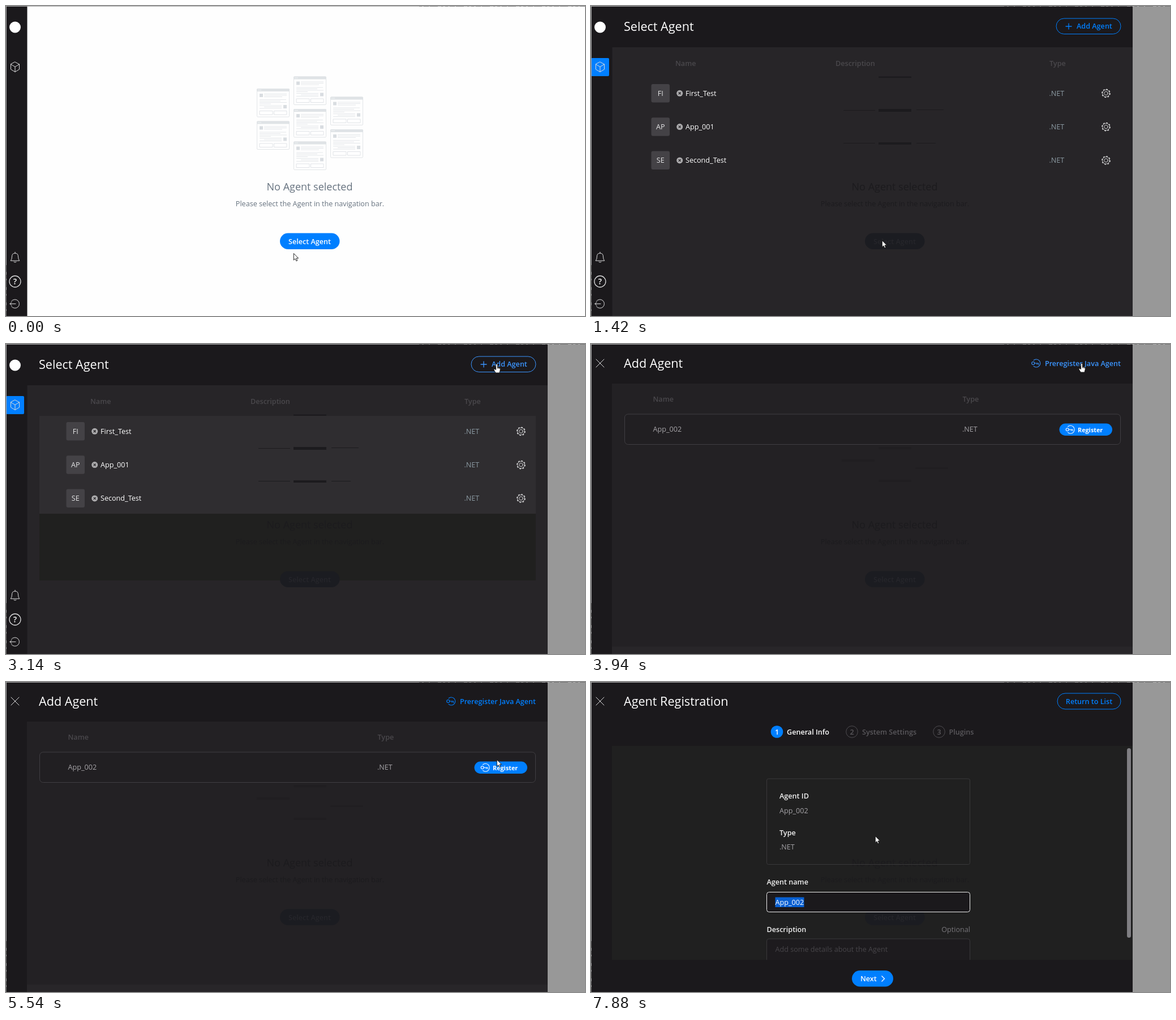
An HTML page that plays this animation: 1023x548 px, repeating every 8 s.

```html
<!DOCTYPE html>
<html lang="en">
<head>
<meta charset="utf-8">
<title>Agent registration</title>
<style>
html, body { margin: 0; width: 100%; height: 100%; overflow: hidden; background: #fefefe; }
svg { display: block; width: 1023px; height: 548px; font: 12.6px "Open Sans", sans-serif; }
.h1 { font-size: 21.6px; fill: #fff; }
.b { font-weight: 600; }
.mid { text-anchor: middle; }
.end { text-anchor: end; }
.white { fill: #fff; }
.head { font-weight: 600; fill: #4a484c; }
.soft { fill: #a5a3a7; }
.type { fill: #8b9aa2; }
.blue { fill: #007fff; }
.line { fill: none; stroke: #dcdcdd; stroke-linecap: round; stroke-linejoin: round; }
.edge { fill: none; stroke: #007fff; }
.bar { fill: #1b191c; }
.ghost { fill: #1c1b1e; }

.scene, .hover, .tint, #arrow, #hand { display: none; }
.home #home, .list #list, .add #add, .form #form,
.home #menu, .list #menu, .arrow #arrow, .hand #hand { display: inline; }
.list .active { fill: #007fff; }
.row3 .r3, .row1 .r1, .low .tint.lo, .all .tint { display: inline; }

.home.hot .cta, .add.reg .cta2 { fill: #3399ff; }
.home.press .cta, .add.press .cta2 { fill: #006bd8; }
.list.hot .new .blue, .add.pre .link .blue { fill: #3b95ff; }
.list.hot .new .edge, .add.pre .link .edge { stroke: #3b95ff; }
.list.press .new .blue { fill: #006bd8; }
.list.press .new .edge { stroke: #006bd8; }
</style>
</head>
<body>
<svg id="stage" viewBox="0 0 1023 548" class="home arrow">
  <defs>
    <g id="card">
      <rect x=".5" y=".5" width="57" height="49.5" rx="1.5" fill="#fefefe" stroke="#e2e5e8"/>
      <path d="M0 1.5Q0 0 1.5 0H56.5Q58 0 58 1.5V5H0Z" fill="#dfe3e6"/>
      <path d="M2 2.5H8" stroke="#fff" stroke-dasharray="1.2 1"/>
      <path d="M5 9h6v6H5ZM47 29h6v6H47Z" fill="#d9dde1"/>
      <path d="M13 9.5H53M13 12H53M13 14.5H45M5 19.5H52M5 22H42M5 24.5H53M5 27H25M5 30H44M13 32.5H44M5 35H44" stroke="#e4e7ea"/>
      <path d="M5 39.5H28V46H5ZM30.500 39.500H53V46H30.500Z" fill="#fff" stroke="#e0e3e7"/>
    </g>
    <g id="gear" class="line">
      <circle r="7.100" stroke-width="1.500" stroke-dasharray="2.790" stroke-linecap="butt"/>
      <circle r="6.200" stroke-width=".8"/>
      <circle r="3.200" stroke-width=".9"/>
    </g>
    <g id="off">
      <circle r="5.500" fill="#acabad"/>
      <path d="M-2 -2L2 2M2 -2L-2 2" stroke="#272528" stroke-width="1.300"/>
    </g>
    <g id="key" fill="none" stroke-width="1.100" stroke-linecap="round">
      <circle cx="-4.800" r="2.500"/>
      <path d="M-2.300 0H4.500V2.500M2 0V2M-4 -5.200A7 7 0 1 1 -4 5.200"/>
    </g>
    <path id="close" class="line" d="M-7 -7L7 7M7 -7L-7 7"/>
    <g id="under" class="ghost">
      <text x="536.500" y="326" class="mid" font-size="18">No Agent selected</text>
      <text x="537" y="353.500" class="mid">Please select the Agent in the navigation bar.</text>
      <rect x="484" y="401.500" width="105.500" height="28.500" rx="14.250" fill="#1b1c21"/>
      <text x="536.500" y="420.500" class="mid b" fill="#26262b">Select Agent</text>
    </g>
  </defs>

  <rect width="1023" height="548" fill="#fefefe"/>

  <g id="home" class="scene">
    <use href="#card" x="443" y="146"/><use href="#card" x="443" y="203.500"/>
    <use href="#card" x="508" y="124.500"/><use href="#card" x="508" y="182"/><use href="#card" x="508" y="239.500"/>
    <use href="#card" x="573" y="160.500"/><use href="#card" x="573" y="218"/>
    <text x="536.500" y="326" class="mid" font-size="18" fill="#66727f">No Agent selected</text>
    <text x="537" y="353.500" class="mid" fill="#66727f">Please select the Agent in the navigation bar.</text>
    <rect class="blue cta" x="484" y="401.500" width="105.500" height="28.500" rx="14.250"/>
    <text x="536.500" y="420.500" class="mid b white">Select Agent</text>
  </g>

  <g id="list" class="scene">
    <rect x="37" width="920" height="548" fill="#272528"/>
    <rect class="bar" x="37" width="920" height="73"/>
    <rect x="957" width="66" height="548" fill="#989898"/>
    <rect class="tint" x="59" y="127" width="877" height="120" fill="#2f2d30"/>
    <rect class="tint lo" x="59" y="246" width="877" height="54" fill="#2f2d30"/>
    <rect class="tint lo" x="59" y="300" width="877" height="118" fill="#20201f"/>
    <use href="#under"/>
    <path class="ghost" d="M508 124.500h58v2.500h-58ZM508 182h58v5h-58ZM508 241h58v4h-58ZM446 184h56v1h-56ZM575 183h48v1h-48ZM446 242h56v1h-56ZM575 242h34v1h-34Z"/>
    <rect class="hover r1" x="59.500" y="127.500" width="876" height="53" rx="6" fill="none" stroke="#15548e"/>
    <rect class="hover r3" x="59.500" y="246.500" width="876" height="53" rx="6" fill="none" stroke="#15548e"/>
    <text x="58" y="43.500" class="h1">Select Agent</text>
    <g class="new">
      <rect class="edge" x="822" y="22" width="114" height="27.500" rx="13.750"/>
      <path class="edge" d="M838.500 36h11M844 30.500v11" stroke-width="1.300"/>
      <text x="858" y="40.300" class="b blue">Add Agent</text>
    </g>
    <g class="head">
      <text x="149" y="105.500">Name</text>
      <text x="432" y="105.500">Description</text>
      <text x="810" y="105.500">Type</text>
    </g>
    <g id="rows"></g>
  </g>

  <g id="add" class="scene">
    <rect width="957" height="548" class="bar"/>
    <rect x="957" width="66" height="548" fill="#989898"/>
    <rect x="37" y="70" width="920" height="478" fill="#232124"/>
    <rect x="37" y="535" width="920" height="13" fill="#282629"/>
    <use href="#under"/>
    <path d="M443 146h58v4h-58ZM443 204h58v4h-58ZM508 182h58v4h-58ZM508 240h58v4h-58ZM573 218h58v3h-58Z" fill="#201e21"/>
    <rect x="59.500" y="124" width="876" height="53.500" rx="6" fill="#211f22" stroke="#403e42"/>
    <use href="#close" x="16" y="34"/>
    <text x="58" y="41.500" class="h1">Add Agent</text>
    <g class="link">
      <use href="#key" x="786" y="34" class="edge"/>
      <text x="936" y="38.500" class="b blue end">Preregister Java Agent</text>
    </g>
    <text x="109.500" y="102" class="head">Name</text>
    <text x="656.500" y="102" class="head">Type</text>
    <text x="109.500" y="155.300" class="soft">App_002</text>
    <text x="656" y="155.300" class="soft">.NET</text>
    <rect class="blue cta2" x="827.500" y="140.500" width="93.500" height="21.500" rx="10.750"/>
    <use href="#key" x="846.500" y="151.200" stroke="#fff"/>
    <text x="860" y="155.500" class="white" font-size="10.800" font-weight="700">Register</text>
  </g>

  <g id="form" class="scene">
    <rect width="957" height="548" class="bar"/>
    <rect x="957" width="66" height="548" fill="#989898"/>
    <rect x="37" y="113" width="920" height="378.500" fill="#202020"/>
    <use href="#under"/>
    <use href="#close" x="16" y="34"/>
    <text x="58" y="41.500" class="h1">Agent Registration</text>
    <rect class="edge" x="824" y="20" width="112" height="28" rx="14"/>
    <text x="880" y="38.500" class="b blue mid">Return to List</text>
    <circle cx="328.500" cy="88" r="10.800" class="blue"/>
    <g fill="none" stroke="#4d4b4f"><circle cx="461" cy="88" r="10.300"/><circle cx="615" cy="88" r="10.300"/></g>
    <g class="b" fill="#5a585c">
      <text x="328.500" y="92.500" class="mid white">1</text><text x="346" y="92.500" class="white">General Info</text>
      <text x="461" y="92.500" class="mid">2</text><text x="479" y="92.500">System Settings</text>
      <text x="615" y="92.500" class="mid">3</text><text x="632.500" y="92.500">Plugins</text>
    </g>
    <rect x="947" y="117" width="7" height="335" rx="3.500" fill="#7f7e82"/>
    <rect x="310.500" y="171" width="359" height="151.500" rx="3" fill="none" stroke="#39383a"/>
    <g class="b" fill="#f2f2f2">
      <text x="333" y="206.300">Agent ID</text>
      <text x="333" y="271">Type</text>
      <text x="310.500" y="358">Agent name</text>
      <text x="310.500" y="442">Description</text>
    </g>
    <g class="soft"><text x="333" y="231.500">App_002</text><text x="333" y="296.300">.NET</text></g>
    <rect x="310.500" y="371.500" width="359" height="35" rx="4" fill="#1b191c" stroke="#ededed"/>
    <rect x="325.500" y="380.500" width="51" height="17.500" fill="#0860d2"/>
    <text x="325.500" y="394" class="white">App_002</text>
    <text x="670" y="442" class="end" fill="#77757a">Optional</text>
    <path d="M310.500 491.500V458q0-4 4-4H665.500q4 0 4 4V491.500" fill="#1d1b1e" stroke="#39383a"/>
    <text x="325.500" y="477.300" fill="#474549">Add some details about the Agent</text>
    <rect class="bar" x="37" y="491.500" width="920" height="56.500"/>
    <rect class="blue" x="461" y="510" width="73" height="28.500" rx="14.250"/>
    <text x="476" y="529" class="b white">Next</text>
    <path d="M513.500 519.500L518.500 524.500L513.500 529.500" fill="none" stroke="#fff" stroke-width="1.300"/>
  </g>

  <g id="menu" class="scene">
    <rect class="bar" width="37.500" height="548"/>
    <circle cx="16" cy="37.500" r="10" class="white"/>
    <rect class="bar active" y="92" width="32" height="32" rx="2"/>
    <path class="line" d="M16 99L23.500 103V112L16 116.500L8.500 112V103ZM8.500 103L16 107.500L23.500 103M16 107.500V116.500"/>
    <path class="line" d="M8.500 450Q10.500 448 10.500 443Q10.500 437 16 437Q21.500 437 21.500 443Q21.500 448 23.500 450ZM16 437V435M14 452.500Q16 454 18 452.500"/>
    <circle class="line" cx="16" cy="487" r="10" stroke-width="1.300"/>
    <text x="16" y="492" class="mid b white" font-size="14">?</text>
    <path class="line" d="M9.500 522A7.700 7.700 0 1 1 9.500 531M17 526.500H7M10 523.500L7 526.500L10 529.500"/>
  </g>

  <path d="M.5 0V548M0 .5H1023" stroke="#a8a8a8"/>
  <path d="M730 .5H1023" stroke="#777" stroke-dasharray="5 3 9 2 14 6 3 4"/>
  <path d="M.5 458V548" stroke="#666" stroke-dasharray="12 5 7 3"/>

  <g id="cursor" stroke="#111" stroke-width=".9" fill="#fff" stroke-linejoin="round">
    <path id="arrow" d="M.3 .4V12.200L3 9.700L4.900 13.800L6.800 13L5 8.900H8.600Z"/>
    <path id="hand" d="M-1.400 1.500Q-1.400 .2 0 .2T1.400 1.500V6L4.800 6.700Q6.200 7 6.200 8.500V11L5 16H-1.800L-4.600 11.300Q-6 9 -4 9L-1.400 10.500ZM1.400 6V8.500M3.200 6.500V8.800M4.800 6.700V9"/>
  </g>
</svg>
<script>
const LOOP = 8000;
const stage = document.getElementById('stage');
const cursor = document.getElementById('cursor');

document.getElementById('rows').innerHTML = ['First_Test', 'App_001', 'Second_Test'].map((name, i) => {
  const y = 154.3 + i * 59.3;
  return `<rect x="106.5" y="${y - 16.3}" width="32.5" height="32.5" rx="3" fill="#444246"/>
    <text x="122.7" y="${y + 4.5}" class="mid" fill="#e4e4e5">${name.slice(0, 2).toUpperCase()}</text>
    <use href="#off" x="156.7" y="${y}"/>
    <text x="167" y="${y + 4.5}" class="white">${name}</text>
    <text x="809.5" y="${y + 4.5}" class="type">.NET</text>
    <use href="#gear" x="910" y="${y}"/>`;
}).join('');

// start time, cursor x, cursor y, stage classes
const steps = [
  [0, 508, 437, 'home arrow'],
  [120, 516, 414, 'home hand hot'],
  [1280, 516, 414, 'home hand press'],
  [1420, 514, 414, 'list arrow'],
  [2260, 520, 406, 'list arrow'],
  [2410, 620, 268, 'list arrow low row3'],
  [2580, 702, 170, 'list arrow all row1'],
  [2730, 818, 108, 'list arrow all'],
  [2900, 846, 68, 'list arrow all'],
  [3020, 864, 40, 'list hand all hot'],
  [3140, 867, 35, 'list hand all hot'],
  [3810, 867, 35, 'list hand all press'],
  [3940, 867, 34, 'add hand pre'],
  [4670, 866, 37, 'add hand pre'],
  [4790, 865, 41, 'add hand pre'],
  [4940, 861, 61, 'add arrow'],
  [5090, 863, 93, 'add arrow'],
  [5240, 865, 118, 'add arrow'],
  [5390, 866, 131, 'add arrow'],
  [5540, 867, 137, 'add arrow'],
  [5660, 868, 145, 'add hand reg'],
  [5780, 869, 148, 'add hand reg'],
  [6340, 869, 148, 'add hand press'],
  [6490, 868, 148, 'form arrow'],
  [7350, 862, 150, 'form arrow'],
  [7480, 812, 162, 'form arrow'],
  [7610, 738, 174, 'form arrow'],
  [7760, 598, 222, 'form arrow'],
  [7880, 502, 272, 'form arrow']
];

let shown;
function draw() {
  const t = performance.now() % LOOP;
  const step = steps.findLast(s => s[0] <= t);
  if (step !== shown) {
    shown = step;
    stage.setAttribute('class', step[3]);
    cursor.setAttribute('transform', `translate(${step[1]} ${step[2]})`);
  }
  requestAnimationFrame(draw);
}
draw();
</script>
</body>
</html>
```
